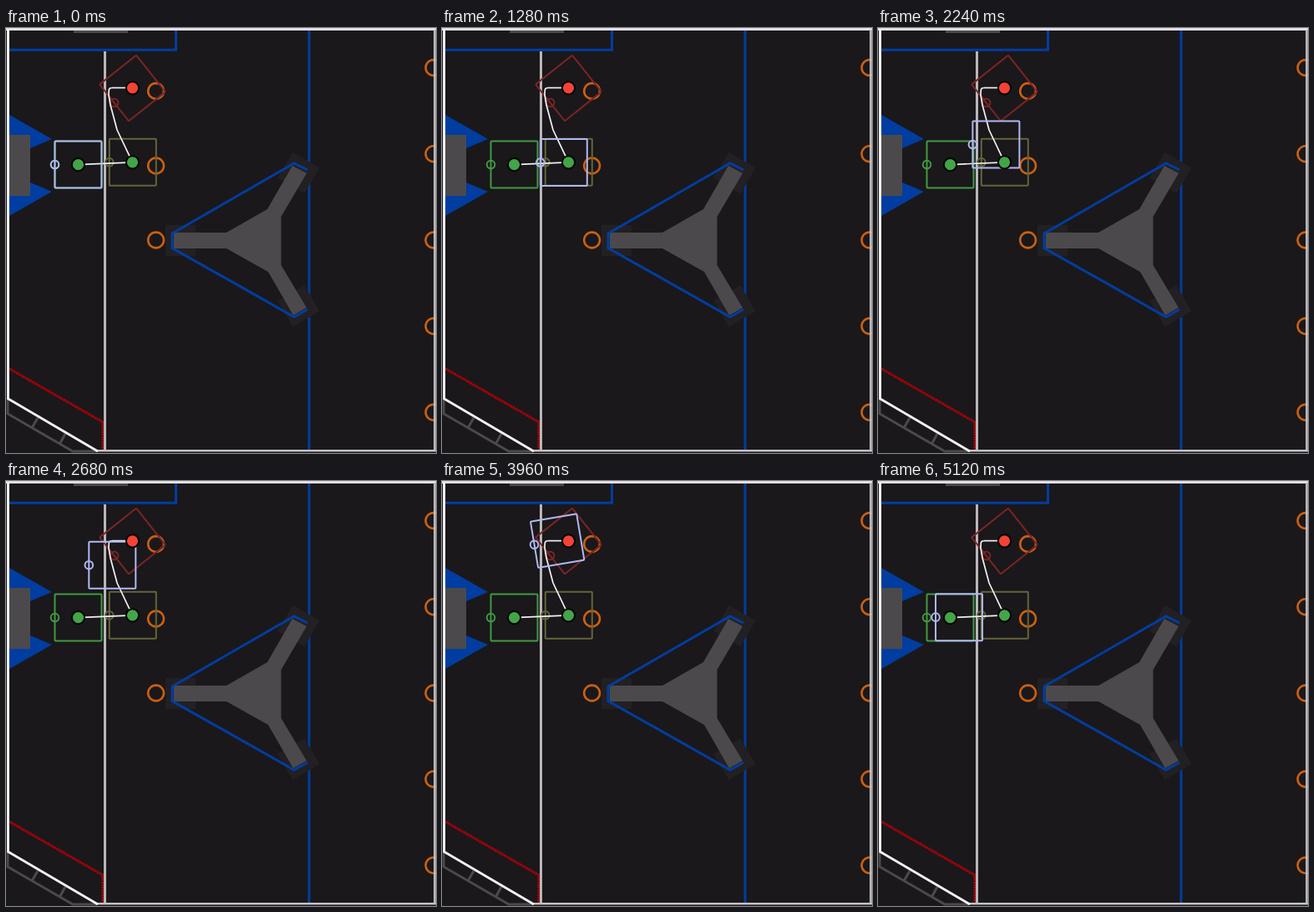
Write an HTML page that moves like this. It is 515x509 px and loops after 5160 ms.

```html
<!DOCTYPE html>
<html lang="en">
<head>
<meta charset="utf-8">
<title>Robot path</title>
<style>
  html, body { margin: 0; width: 100%; height: 100%; overflow: hidden; background: #1a181b; }
  svg { display: block; width: 515px; height: 509px; fill: none; }
  .blue { stroke: #003da0; stroke-width: 3; }
  .gray { fill: #4b494b; }
  .ring { stroke: #cc6010; stroke-width: 2.6; }
  .patch { fill: #222023; }
  .bot { stroke: var(--c); stroke-width: 2; stroke-linejoin: round; }
  .bot circle { fill: var(--d, var(--c)); stroke: #141316; stroke-width: 1; }
  .point { stroke: #050505; stroke-width: 2; }
  .trail { stroke: #f2f0f2; stroke-width: 1.7; stroke-linejoin: round; }
</style>
</head>
<body>
<svg viewBox="0 0 515 509">
  <defs>
    <g id="body">
      <rect x="-28" y="-28" width="56" height="56" rx="1"/>
      <circle cx="-28" r="4.8"/>
    </g>
    <rect id="pad" x="-18" y="-18.5" width="36" height="37"/>
  </defs>

  <!-- field -->
  <path d="M2 444V462L80 507H108M38 467L31 479M71 486L65 497" stroke="#4b494b" stroke-width="3"/>
  <path d="M4 408L116 472V505" stroke="#a80008" stroke-width="3" stroke-dasharray="2.5 .6"/>
  <path d="M118.5 28V505" stroke="#b8b6b8" stroke-width="3"/>
  <path class="gray" d="M81 3H146V6H81ZM4 128H29V201H4Z"/>
  <path fill="#003da0" d="M4 104L55 133L29 144V128H4ZM4 225L55 196L29 185V201H4Z"/>
  <path class="blue" d="M4 26.3H203.5V3M363 3V505"/>
  <g class="patch">
    <use href="#pad" x="209" y="254.5"/>
    <use href="#pad" transform="translate(350.5 173.5) rotate(-60)"/>
    <use href="#pad" transform="translate(350.5 333) rotate(60)"/>
  </g>
  <path class="gray" d="M201 245H264L313 217L343 165L360 174L329.5 226V284L360 335L344 344L314 292L264 264H201Z"/>
  <path class="blue" d="M361 170L345 162L199 246V263.5L345 346L361 337"/>
  <g id="rings" class="ring"></g>
  <path d="M0 1.5H515" stroke="#e2e0e2" stroke-width="3"/>
  <path d="M513.5 2V507M108 506.3H515" stroke="#c4c2c4" stroke-width="2.6"/>
  <path d="M2.5 2V444L110 507" stroke="#f2f0f2" stroke-width="3"/>

  <!-- waypoints -->
  <g class="bot" style="--c:#7a2524;--d:#c0352e" transform="translate(151.5 72) rotate(-38.5)"><use href="#body"/></g>
  <g class="bot" style="--c:#62653a;--d:#77734c" transform="translate(151.8 160.8)"><use href="#body"/></g>
  <g class="bot" style="--c:#409a42" transform="translate(86.5 163.6)"><use href="#body"/></g>

  <path class="trail" id="leg1" d="M86.5 163.6L151.5 160.8"/>
  <path class="trail" id="leg2" d="M151.5 160.8L133 122L125 92L123 80L123.3 74L124.3 72.2L126.5 71.6"/>
  <path class="trail" id="leg3" d="M126.5 71.6H151.5"/>

  <g class="bot" id="robot" style="--c:#b0b8f2"><use href="#body"/></g>

  <g class="point">
    <circle cx="86.5" cy="163.6" r="7.6" fill="#43a547"/>
    <circle cx="151.5" cy="160.8" r="7.6" fill="#43a547"/>
    <circle cx="151.5" cy="71.8" r="7.6" fill="#f44336"/>
  </g>
</svg>
<script>
  const LOOP = 5160, REPLAY = 4660;
  const $ = id => document.getElementById(id);

  const ring = (x, y) => `<circle cx="${x}" cy="${y}" r="9.4"/>`;
  $('rings').innerHTML =
    [75.5, 165, 254].map(y => ring(179.6, y)).join('') +
    [47.5, 150.7, 254, 357, 460.3].map(y => ring(512, y)).join('');

  const legs = [
    { path: $('leg1'), from: 0, to: 1620, turn: 0 },
    { path: $('leg2'), from: 1620, to: 3400, turn: 0 },
    { path: $('leg3'), from: 3400, to: 4560, turn: -20.3 }
  ];

  // constant acceleration, then equal braking
  const ease = p => p < 0.5 ? 2 * p * p : 1 - 2 * (1 - p) ** 2;

  function draw(now) {
    const t = now % LOOP % REPLAY;
    const leg = legs.find(l => t < l.to) || legs[2];
    const k = ease(Math.min(1, (t - leg.from) / (leg.to - leg.from)));
    const p = leg.path.getPointAtLength(k * leg.path.getTotalLength());
    $('robot').setAttribute('transform', `translate(${p.x} ${p.y}) rotate(${k * leg.turn})`);
  }

  const start = performance.now();
  function tick() {
    draw(performance.now() - start);
    requestAnimationFrame(tick);
  }
  tick();
</script>
</body>
</html>
```
